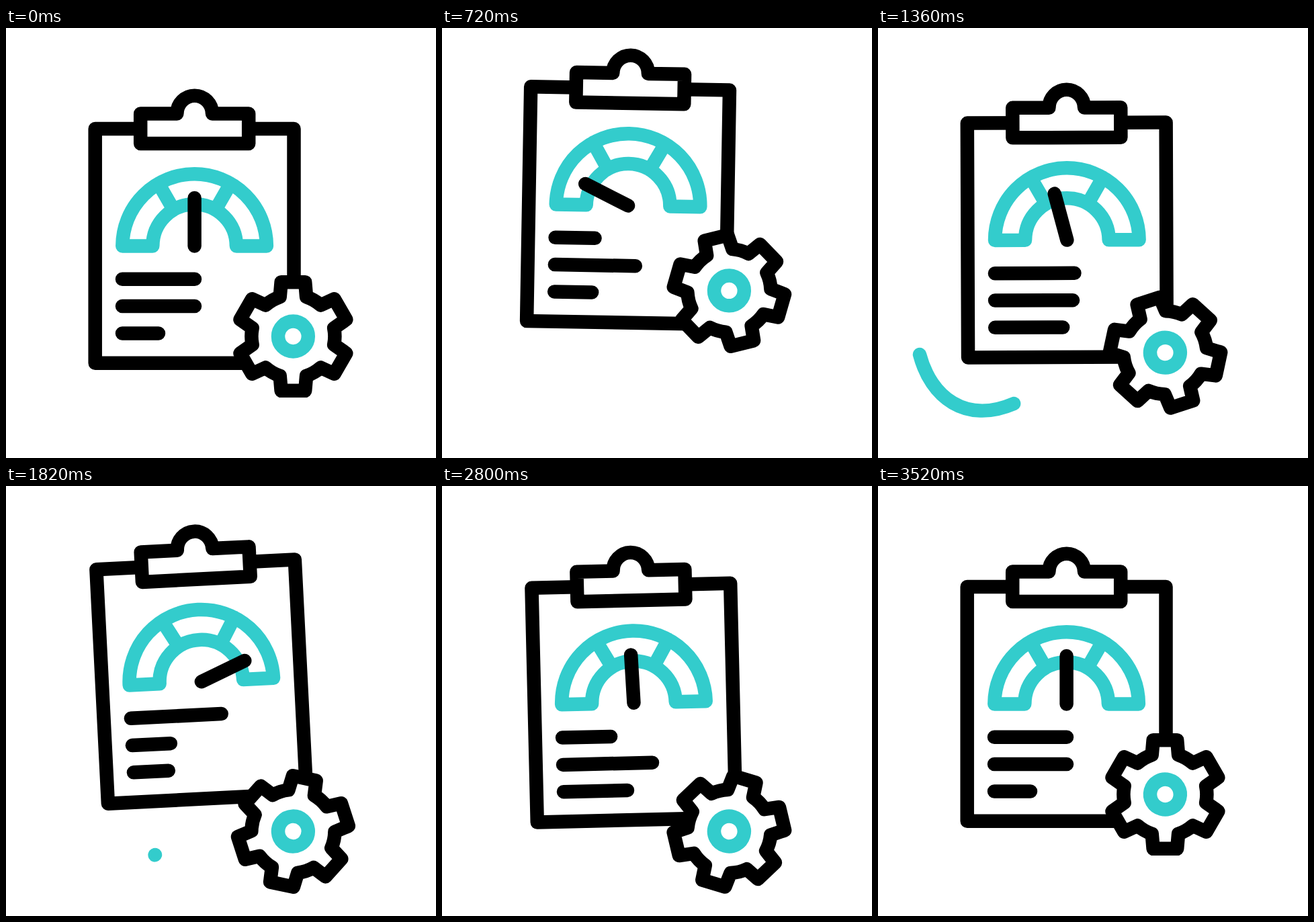
An HTML page that plays this animation: 640 by 640 pixels, repeating every 3600 ms.

```html
<!DOCTYPE html>
<html lang="en">
<head>
<meta charset="utf-8">
<title>Performance report</title>
<style>
  html, body { margin: 0; width: 100%; height: 100%; overflow: hidden; background: #fff; }
  svg { display: block; width: 100vw; height: 100vh; }
  svg * { stroke-linecap: round; stroke-linejoin: round; }
  .ink { stroke: #000; }
  .teal { stroke: #3cc; }
  .paper { fill: #fff; }
</style>
</head>
<body>
<svg viewBox="0 0 640 640" fill="none" stroke-width="20.5">
  <path id="swooshA" class="teal" pathLength="1" d="M62 486C80 555 140 597 222 549"/>
  <path id="swooshB" class="teal" pathLength="1" d="M478 118C530 120 575 165 581.5 235"/>
  <g id="board">
    <path class="ink paper" d="M132.7 150H428.5V498.8H132.7Z"/>
    <path class="teal" d="M173.3 324.5A107.3 107.3 0 0 1 387.9 324.5H342.9A62.3 62.3 0 0 0 218.3 324.5Z
      M249.4 270.5L227 231.6M311.8 270.5L334.2 231.6"/>
    <path id="lines" class="ink"/>
    <path id="needle" class="ink" d="M280.6 324.5V253"/>
    <path class="ink paper" d="M200.2 127.5H254.4A26.3 26.8 0 0 1 307 127.5H361.2V172H200.2Z"/>
  </g>
  <g id="gear">
    <path id="teeth" class="ink paper"/>
    <circle class="teal" r="22.4"/>
  </g>
</svg>
<script>
const LOOP = 3600;
const $ = id => document.getElementById(id);

// Smooth curve through [time, value] pairs, flat at peaks and at both ends.
function track(...keys) {
  const rate = i => (keys[i + 1][1] - keys[i][1]) / (keys[i + 1][0] - keys[i][0]);
  const slopes = keys.map((_, i) => {
    if (!i || i === keys.length - 1) return 0;
    const a = rate(i - 1), b = rate(i);
    return a * b <= 0 ? 0 : 2 * a * b / (a + b);
  });
  return t => {
    if (t <= keys[0][0]) return keys[0][1];
    const i = keys.findIndex(k => k[0] > t) - 1;
    if (i < 0) return keys[keys.length - 1][1];
    const [t0, v0] = keys[i], [t1, v1] = keys[i + 1];
    const h = t1 - t0, s = (t - t0) / h, r = 1 - s;
    return v0 * r * r * (1 + 2 * s) + v1 * s * s * (1 + 2 * r)
      + h * s * r * (slopes[i] * r - slopes[i + 1] * s);
  };
}

// Tracks that share the same key times.
const poses = (...values) => {
  const times = [200, 720, 1360, 1820, 2400, 2800, 3520];
  return track(...times.map((t, i) => [t, values[i]]));
};

const boardY = track([200, 0], [720, -60], [820, -64], [1360, -9], [1490, 0], [1820, -33],
  [2140, -64], [2400, -42], [2800, -1.7], [2900, -1], [3520, 0]);
const boardTurn = track([200, 0], [720, 1], [960, 2], [1360, -.2], [1800, -2.9],
  [2350, 2], [2400, 1.9], [2800, -1.36], [2860, -1.5], [3520, 0]);
const needleTurn = track([200, 0], [720, -64], [800, -66], [1360, -15], [1820, 67],
  [2110, 82], [2400, 74], [2800, -2], [2880, -6], [3520, 0]);
const gearY = track([200, 0], [720, -68], [760, -69], [1360, 24], [1640, 55], [2820, 55], [3520, 0]);
const gearTurn = poses(0, 46, 102, 132, 166, 196.5, 240);
const lengths = [
  poses(108, 59, 118.5, 135, 53, 72, 108),
  poses(108, 120, 116, 57, 99, 133, 108),
  poses(54, 56, 101, 52, 36, 95, 54)
];
const swooshes = [
  { path: $('swooshA'), start: 880, end: 1830, head: track([880, 0], [1484, 1]), tail: track([1360, 0], [1830, 1]) },
  { path: $('swooshB'), start: 2960, end: 3510, head: track([2960, 0], [3320, 1]), tail: track([3160, 0], [3510, 1]) }
];

function gearPath() {
  const at = (deg, r) => {
    const a = deg * Math.PI / 180;
    return `${r * Math.sin(a)} ${-r * Math.cos(a)}`;
  };
  let d = '';
  for (let a = 0; a < 360; a += 60) {
    d += `${a ? 'A62 62 0 0 1' : 'M'}${at(a - 18.5, 62)}L${at(a - 12.4, 82.8)}`
      + `L${at(a + 12.4, 82.8)}L${at(a + 18.5, 62)}`;
  }
  return d + `A62 62 0 0 1 ${at(-18.5, 62)}Z`;
}

function draw(t) {
  $('board').setAttribute('transform', `translate(0 ${boardY(t)}) rotate(${boardTurn(t)} 281 120)`);
  $('needle').setAttribute('transform', `rotate(${needleTurn(t)} 280.6 324.5)`);
  $('lines').setAttribute('d', lengths.map((len, i) => `M173 ${373.8 + 40.3 * i}h${len(t)}`).join(''));
  $('gear').setAttribute('transform', `translate(427.4 ${459 + gearY(t)}) rotate(${gearTurn(t)})`);
  for (const s of swooshes) {
    const tail = Math.min(s.tail(t), .998);
    s.path.style.display = t >= s.start && t < s.end ? '' : 'none';
    s.path.setAttribute('stroke-dasharray', `${Math.max(s.head(t) - tail, .001)} 2`);
    s.path.setAttribute('stroke-dashoffset', -tail);
  }
}

$('teeth').setAttribute('d', gearPath());
const begin = performance.now();
function tick() {
  draw((performance.now() - begin) % LOOP);
  requestAnimationFrame(tick);
}
tick();
</script>
</body>
</html>
```
